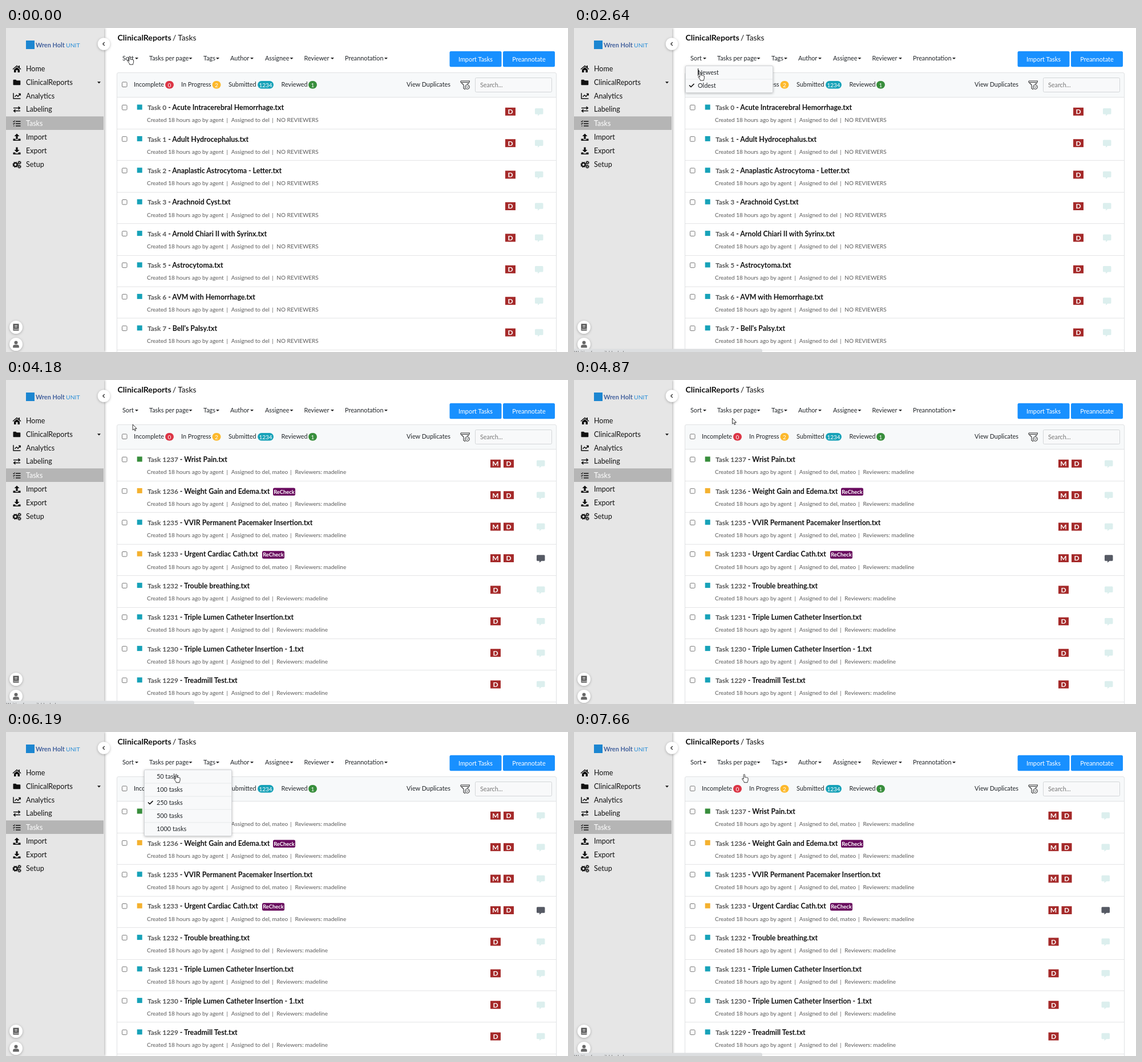
An HTML page for the animation above (7.99 s loop, 985 px wide and 569 px high).

```html
<!DOCTYPE html>
<html lang="en">
<head>
<meta charset="utf-8">
<title>Task list</title>
<style>
html, body { margin: 0; width: 100%; height: 100%; overflow: hidden; background: #fff; }
svg { display: block; width: 985px; height: 569px; font: 10.85px Lato, sans-serif; }
.b { font-weight: 700; }
.soft { filter: drop-shadow(0 1px 2px #0004); }
</style>
</head>
<body>
<svg id="stage" viewBox="0 0 985 569"></svg>
<script>
const rect = (x, y, w, h, fill, more = '') =>
  `<rect x="${x}" y="${y}" width="${w}" height="${h}" fill="${fill}" ${more}/>`;
const text = (x, y, s, size = 10.85, fill = '#212529', more = '') =>
  `<text x="${x}" y="${y}" font-size="${size}" fill="${fill}" ${more}>${s}</text>`;
const path = (d, fill = '#111', more = '') => `<path d="${d}" fill="${fill}" ${more}/>`;
const line = (d, w = 1.5, color = '#111') =>
  path(d, 'none', `stroke="${color}" stroke-width="${w}" stroke-linejoin="round"`);
const at = (x, y, s) => `<g transform="translate(${x} ${y})">${s}</g>`;
const layer = (id, s) => `<g id="${id}">${s}</g>`;
const bold = 'class="b"', mid = 'text-anchor="middle"', midBold = `${mid} ${bold}`;
const teal = '#17a2b8', amber = '#f4b12f', green = '#388e3c';
const box = y => rect(203.5, y - 4.5, 8.5, 8.5, '#fff', 'rx="1.5" stroke="#777"');
const tick = 'M0 3.5L3 6.5 8.5 1';

// Icons are drawn around their own centre.
const gear = (x, y, r) => at(x, y,
  `<circle r="${r}" fill="none" stroke="#111" stroke-width="${r * .75}"/>` +
  `<circle r="${r * 1.45}" fill="none" stroke="#111" stroke-width="1.3" stroke-dasharray="${r * .57}"/>`);
const tray = path('M-6.5 2.5h4v2h5v-2h4v3.5h-13z');
const icons = [
  path('M-7.5 0L0-6.5 3-4v-2h2v3.7L7.5 0l-1 1L0-4.6-6.5 1zM-5 1L0-3.3 5 1v5H1.5V2h-3v4H-5z'),
  path('M-6.5-4q0-1 1-1h3.7l1.6 1.6h5.5q1 0 1 1v6q0 1-1 1h-10.8q-1 0-1-1z'),
  line('M-6-5V4.7H6.5M-3.5 1.5l3-3L2 1l4-4.5M3-3.7h3.2v3.2'),
  line('M-6-2.5H5M2.5-5L5.5-2.5 2.5 0M6 2.5H-5M-2.5 0l-3 2.5 3 2.5', 1.6),
  line('M-2-4h8.5M-2 0h8.5M-2 4h8.5', 1.7) + line('M-6.5-4.2l1.1 1.1 2-2.2M-6.5-.2l1.1 1.1 2-2.2M-6 4h1.8', 1.2),
  path('M0-6.5L4.5-2H1.6v5h-3.2v-5h-2.9z') + tray,
  path('M0 2.5L4.5-2H1.6v-4.5h-3.2V-2h-2.9z') + tray,
  gear(-2.5, 0, 3.1) + gear(4.5, -3.5, 1.8) + gear(4.5, 3.5, 1.8)
];
const pages = ['Home', 'ClinicalReports', 'Analytics', 'Labeling', 'Tasks', 'Import', 'Export', 'Setup'];
const pageY = [72, 95.7, 119.3, 143, 168, 192, 216, 240];

const disc = (x, y, r, s) => at(x, y, `<circle r="${r}" fill="#fff" class="soft"/>${s}`);

const sidebar =
  rect(0, 0, 172, 569, '#e6e6e6', 'style="filter:drop-shadow(1px 0 2px #0005)"') +
  rect(35, 22, 15, 15, '#1c86d1') +
  text(52, 34, 'Wren Holt', 10.9, '#41609c', bold) +
  text(105, 34, 'UNIT', 10.4, '#2a8fd8') +
  rect(0, 155.3, 171, 23.7, '#b5b5b5') +
  pages.map((p, i) => at(19, pageY[i], icons[i]) +
    text(35, pageY[i] + 4.4, p, 12.5, i == 4 ? '#fff' : '#111')).join('') +
  path('M160 94.3h6l-3 3.2z') +
  disc(171.5, 28, 10.8, line('M1.3-3L-1.7 0l3 3', 1.3, '#333')) +
  disc(17.5, 525.5, 11.5, path('M-5-6H5V6H-5z', '#555') + line('M-2.5-3h5M-2.5-.5h5M-4 3.5h9', 1, '#fff')) +
  disc(17.5, 555.5, 11.5, '<circle cy="-3" r="3" fill="#666"/>' + path('M-5.3 6V4q0-3.2 3.2-3.2h4.2q3.2 0 3.2 3.2v2z', '#666'));

const menus = [['Sort', 204, 229], ['Tasks per page', 251, 323.5], ['Tags', 346, 371], ['Author', 393, 431],
  ['Assignee', 454, 500.5], ['Reviewer', 522.5, 572], ['Preannotation', 594, 666]];
const counts = [['Incomplete', 224, 279, 15, '#dc3545', 0], ['In Progress', 307, 361.5, 15, '#fdb92c', 2],
  ['Submitted', 390, 441, 28, teal, 1234], ['Reviewed', 482.5, 530, 15, green, 1]];
const button = (x, s) => rect(x, 40.8, 91, 27.4, '#1890ff', 'rx="2.5"') + text(x + 45.5, 58.5, s, 10.9, '#fff', mid);

const header =
  text(195.5, 21.5, 'ClinicalReports', 14.1, '#111', bold) + text(292, 21.5, '/ Tasks', 13.7, '#111') +
  menus.map(([s, x, c]) => text(x, 57.2, s) + path(`M${c - 3} 52h6l-3 3z`, '#222')).join('') +
  button(777.5, 'Import Tasks') + button(871, 'Preannotate') +
  rect(195, 79, 769.5, 43, '#f7f9fa') +
  line('M194.5 569V81q0-2.5 2.5-2.5H962q2.5 0 2.5 2.5V569M195 121.7H964', 1, '#dfe1e3') +
  box(99.5) +
  counts.map(([s, x, bx, w, fill, n]) => text(x, 103.3, s) + rect(bx, 93, w, 13.5, fill, 'rx="6.7"') +
    text(bx + w / 2, 103.5, n, 10, '#fff', mid)).join('') +
  text(702, 103.3, 'View Duplicates') +
  line('M797 93h15.5l-1 3-3 2.5M797 93v2l5 5v6l3 2M799 95.5h11', 1.1, '#333') +
  '<circle cx="808.5" cy="103.5" r="3.7" fill="none" stroke="#333" stroke-width="1.1"/>' +
  line('M806.5 102.5l2 2 2-2', 1, '#333') +
  rect(822.5, 87.5, 134, 25, '#f8f9fa', 'rx="2" stroke="#d3d6d8"') +
  text(831, 103.5, 'Search...', 10.8, '#777');

const oldest = ['Acute Intracerebral Hemorrhage', 'Adult Hydrocephalus', 'Anaplastic Astrocytoma - Letter',
  'Arachnoid Cyst', 'Arnold Chiari II with Syrinx', 'Astrocytoma', 'AVM with Hemorrhage', "Bell's Palsy"]
  .map((name, id) => ({ id, name, color: teal, reviewer: 'NO REVIEWERS' }));
const newest = [[1237, 'Wrist Pain', green], [1236, 'Weight Gain and Edema', amber, 468],
  [1235, 'VVIR Permanent Pacemaker Insertion', teal], [1233, 'Urgent Cardiac Cath', amber, 449],
  [1232, 'Trouble breathing', teal], [1231, 'Triple Lumen Catheter Insertion', teal],
  [1230, 'Triple Lumen Catheter Insertion - 1', teal], [1229, 'Treadmill Test', teal]]
  .map(([id, name, color, tag], i) =>
    ({ id, name, color, tag, pair: i < 4, note: i == 3, reviewer: 'Reviewers: madeline' }));

const initial = (x, y, s) => rect(x, y, 18, 14, '#a52a2a') + text(x + 9, y + 11.3, s, 12, '#fff', midBold);
const bubble = (x, y, fill) =>
  path(`M${x} ${y + 1.5}q0-1.5 1.5-1.5h11.5q1.5 0 1.5 1.5v7.5q0 1.5-1.5 1.5h-4.5l-3.5 3v-3h-3.5q-1.5 0-1.5-1.5z`, fill);

function list(tasks, badgeX, noteX) {
  return tasks.map((t, i) => {
    const y = 139.8 + 55.4 * i;
    const small = (x, s) => text(x, y + 25.5, s, 10, '#5a5a5a');
    return box(y) + rect(229.7, y - 5.3, 9, 9, t.color) +
      text(248, y + 4.3, `<tspan font-size="11.9" fill="#555">Task ${t.id} </tspan>- ${t.name}.txt`, 12.33, '#111', bold) +
      (t.tag ? rect(t.tag, y - 5.8, 39, 13.5, '#690a5e', 'rx="2.5"') +
        text(t.tag + 19.5, y + 4.3, 'ReCheck', 9.4, '#fff', midBold) : '') +
      small(247, 'Created 18 hours ago by agent') + small(386.5, '|') +
      small(394.7, t.pair ? 'Assigned to del, mateo' : 'Assigned to del') +
      small(t.pair ? 498 : 466, '|') + small(t.pair ? 506.5 : 474.3, t.reviewer) +
      (t.pair ? initial(badgeX, y, 'M') : '') + initial(badgeX + (t.pair ? 23 : 0), y, 'D') +
      bubble(noteX, y + 1.2, t.note ? '#565a64' : '#dcefee') +
      rect(195, Math.round(y + 37.2), 769, 1, '#e4e5e6');
  }).join('');
}

function dropdown(x, items, checked) {
  const h = 23 * items.length + 1;
  return rect(x + .5, 66.5, 153, h, '#f8f9fa', 'rx="1.5" stroke="#d4d6d9" class="soft"') +
    items.map((s, i) => text(x + 22, 81.5 + 23 * i, s) +
      (i ? rect(x + 1, 66.5 + 23 * i, 152, 1, '#e8eaec') : '')).join('') +
    at(x + 7, 74 + 23 * checked, line(tick, 1.7));
}

const status = path('M0 563.5H327q3 0 3 3V569H0z', '#dcdee0') +
  text(0, 573, 'Waiting for available desk...', 8, '#666');
const hand = 'M-1.3 8.5V1a1.1 1.1 0 0 1 2.3 0v4.2q1-.7 2 .2 1-.6 1.9.3 1.6-.3 1.7 1.2v3q0 1.6-1 3v1.3h-6v-1.3l-3.4-4.6q-.3-1.6 1.2-1.3z';
const arrow = 'M0 0v10l2.3-2 1.5 3.4 1.6-.7-1.5-3.3h3.1z';
const outline = 'stroke="#222" stroke-width=".9" stroke-linejoin="round"';

const $ = id => document.getElementById(id);
$('stage').innerHTML = rect(0, 0, 985, 569, '#fff') + header +
  layer('old', list(oldest, 875, 927)) + layer('new', list(newest, 849, 930)) +
  layer('shifted', list(newest, 831.5, 924.5)) + sidebar +
  layer('sort', dropdown(195, ['Newest', 'Oldest'], 1)) +
  layer('paging', dropdown(242, [50, 100, 250, 500, 1000].map(n => n + ' tasks'), 2)) +
  layer('status', status) + rect(0, 71, 1, 13, '#111', 'id="caret"') +
  layer('cursor', path(hand, '#fff', 'id="hand" ' + outline) + path(arrow, '#fff', 'id="arrow" ' + outline));

// Pointer stops: time, x, y.
const track = [[0, 217, 50], [1000, 217, 50], [1350, 221.5, 78], [4180, 222, 78], [4940, 283, 66],
  [5300, 304, 57], [5640, 304, 57], [6190, 298.5, 74.5], [7990, 298.5, 74.5]];
const ramp = (t, a, b) => Math.min(1, Math.max(0, (t - a) / (b - a)));
const within = (t, ...spans) => spans.some(([a, b]) => t >= a && t < b);
const show = (id, v) => $(id).setAttribute('opacity', +v);

function draw(t) {
  show('old', t < 3780);
  show('new', within(t, [3780, 7660]));
  show('shifted', t >= 7660);
  show('sort', t < 3780 ? ramp(t, 630, 870) : 0);
  show('paging', t < 7660 ? ramp(t, 5460, 5700) : 0);
  show('status', t < 5400 ? ramp(t, 1500, 1690) - ramp(t, 4250, 4700) : ramp(t, 6400, 6530));
  show('caret', within(t, [1550, 2110], [2640, 3170], [3650, 3780], [6460, 6990], [7530, 7660]));
  $('caret').setAttribute('x', t < 5000 ? 217 : 298);

  const i = track.findIndex(p => p[0] > t), [a, ax, ay] = track[i - 1], [b, bx, by] = track[i];
  const k = ramp(t, a, b);
  $('cursor').setAttribute('transform', `translate(${ax + (bx - ax) * k} ${ay + (by - ay) * k})`);
  const pointing = !within(t, [3980, 5150]);
  show('hand', pointing);
  show('arrow', !pointing);
}

function frame() {
  draw(performance.now() % 7990);
  requestAnimationFrame(frame);
}
frame();
</script>
</body>
</html>
```
